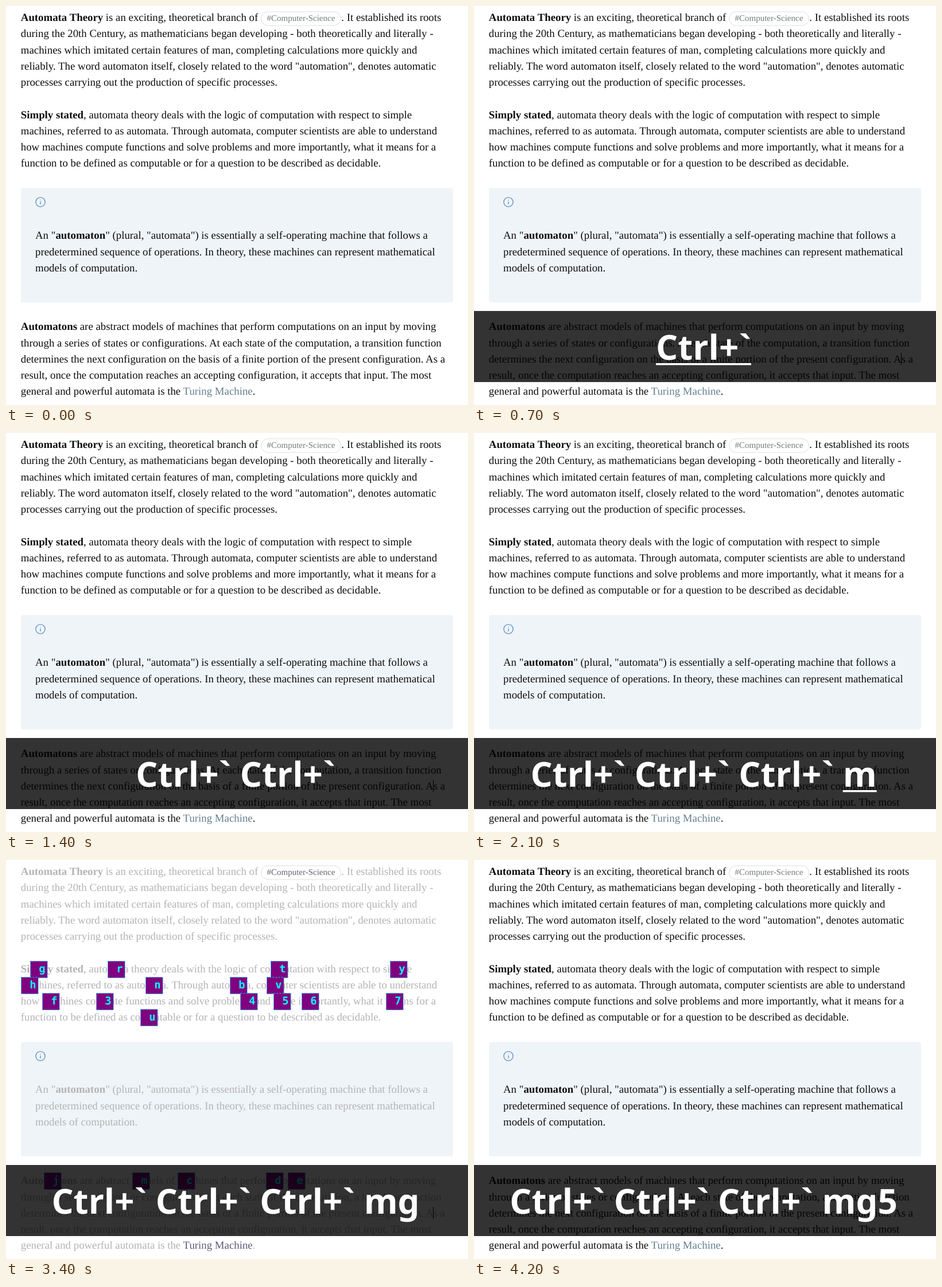
Write an HTML page that moves like this. It is 805x696 px and loops after 4.8 s.

```html
<!DOCTYPE html>
<html lang="en">
<head>
<meta charset="utf-8">
<title>Keyboard jump hints</title>
<style>
  html, body { margin: 0; width: 100%; height: 100%; overflow: hidden; background: #fff; }
  svg { display: block; width: 805px; height: 696px; }
  text { white-space: pre; text-rendering: geometricPrecision; }
  .body { font: 18.82px "Liberation Serif", "Times New Roman", serif; fill: var(--ink); }
  .body .b { font-weight: 700; }
  .body .link { fill: var(--link); }
  .tag { font: 15px "Liberation Serif", "Times New Roman", serif; fill: var(--tag); }
  .hint rect { fill: #800080; stroke: #00bfff; stroke-dasharray: 3 2; }
  .hint text { font: 700 18.82px "DejaVu Sans Mono", monospace; fill: #0ff; }
  #keys { font: 700 60px "Noto Sans", sans-serif; fill: #fff; text-anchor: middle; }
</style>
</head>
<body>
<svg viewBox="0 0 805 696">
  <rect width="805" height="696" fill="#fff"/>
  <rect x="26" y="317.5" width="753" height="199.5" rx="4" fill="#eff4f8"/>
  <g fill="none" stroke="#6394c4" stroke-width="1.4" stroke-linecap="round">
    <circle cx="60" cy="342" r="8.1"/>
    <path d="M60 341.8V345.6M60 338.6V338.7"/>
  </g>
  <g id="page"></g>
  <rect x="444.5" y="10" width="139" height="24" rx="12" fill="#fff" stroke="#dedede"/>
  <text class="tag" x="454.5" y="26">#Computer-Science</text>
  <rect id="caret" width="1" height="21" fill="#000"/>
  <g id="hints"></g>
  <g id="overlay">
    <rect y="532" width="805" height="124" fill="#000" fill-opacity=".8"/>
    <text id="keys" x="400" y="617"></text>
    <rect id="underline" y="623" height="3.4" fill="#fff"/>
  </g>
</svg>
<script>
const LOOP = 4800, STEP = 100, LEADING = 28.23;
const $ = id => document.getElementById(id);

function add(parent, tag, attrs, content = "") {
  const el = document.createElementNS("http://www.w3.org/2000/svg", tag);
  for (const k in attrs) el.setAttribute(k, attrs[k]);
  el.textContent = content;
  parent.append(el);
  return el;
}

// *bold* and _link_ mark up the runs of a line
function addLine(x, y, line) {
  const text = add($("page"), "text", { class: "body", x, y });
  for (const run of line.split(/(\*.+?\*|_.+?_)/)) {
    if (!run) continue;
    const cls = run[0] === "*" ? "b" : run[0] === "_" ? "link" : "";
    add(text, "tspan", { class: cls }, cls ? run.slice(1, -1) : run);
  }
}

function addParagraph(x, y, lines) {
  lines.forEach((line, i) => addLine(x, Math.round(y + i * LEADING), line));
}

addParagraph(25.8, 26.2, [
  "*Automata Theory* is an exciting, theoretical branch of",
  "during the 20th Century, as mathematicians began developing - both theoretically and literally -",
  "machines which imitated certain features of man, completing calculations more quickly and",
  "reliably. The word automaton itself, closely related to the word \"automation\", denotes automatic",
  "processes carrying out the production of specific processes."
]);
addLine(584.3, 26, ". It established its roots");
addParagraph(25.8, 195.6, [
  "*Simply stated*, automata theory deals with the logic of computation with respect to simple",
  "machines, referred to as automata. Through automata, computer scientists are able to understand",
  "how machines compute functions and solve problems and more importantly, what it means for a",
  "function to be defined as computable or for a question to be described as decidable."
]);
addParagraph(51, 406.3, [
  "An \"*automaton*\" (plural, \"automata\") is essentially a self-operating machine that follows a",
  "predetermined sequence of operations. In theory, these machines can represent mathematical",
  "models of computation."
]);
addParagraph(25.8, 565.3, [
  "*Automatons* are abstract models of machines that perform computations on an input by moving",
  "through a series of states or configurations. At each state of the computation, a transition function",
  "determines the next configuration on the basis of a finite portion of the present configuration. As a",
  "result, once the computation reaches an accepting configuration, it accepts that input. The most",
  "general and powerful automata is the _Turing Machine_."
]);

// baseline: label and left edge of each hint
const HINT_ROWS = [
  [26, "m 66"],
  [30, "h 480"],
  [54, "j 234 k 281"],
  [83, "n 26 t 158 yy 359 uu 419 ii 585"],
  [111, "oo 201 ll 544 bb 708"],
  [196, "gg 42 gr 177 gt 461 gy 669"],
  [224, "gh 26 gn 243 gb 390 gv 454"],
  [252, "gf 63 g3 157 g4 408 g5 466 g6 515 g7 662"],
  [280, "gu 234"],
  [565, "gj 66 gm 220 gc 299 gd 453 ge 491 bf 692"],
  [594, "bg 522"],
  [622, "bh 64"],
  [650, "bn 163 bv 705"],
  [678, "be 223 br 364"]
];
const hints = HINT_ROWS.flatMap(([y, row]) =>
  row.match(/\S+ \d+/g).map(item => {
    const [label, left] = item.split(" "), x = +left;
    const g = add($("hints"), "g", { class: "hint" });
    const width = label.length * 11.33 + 7;
    add(g, "rect", { x: x + .5, y: y - 19.5, width, height: 29 });
    const text = add(g, "text", { x: x + 4, y }, label);
    return { g, text, label };
  }));

// [shown from, underlined until, key]
const COMBO = "Ctrl+`";
const PRESSES = [
  [700, 900, COMBO], [1000, 1200, " " + COMBO], [1500, 1600, " " + COMBO],
  [2100, 2300, " m"], [3100, 3300, "g"], [3600, 3800, "5"]
];
// [on, off, x, y]
const CARETS = [
  [400, 900, 744, 605], [1400, 1800, 744, 605], [2300, 2800, 744, 605],
  [3300, 3800, 744, 605], [3800, 4200, 465, 236]
];

const within = (t, from, to) => t >= from && t < to;
const ramp = (t, from, to) => Math.min(1, Math.max(0, (t - from) / (to - from)));
const mix = (a, b, k) => `rgb(${a.map((v, i) => Math.round(v + (b[i] - v) * k))})`;

function drawKeys(t) {
  const pressed = PRESSES.filter(p => t >= p[0]);
  $("overlay").style.display = pressed.length ? "" : "none";
  if (!pressed.length) return;
  const keys = $("keys"), full = pressed.map(p => p[2]).join("");
  if (keys.textContent !== full) keys.textContent = full;
  const [, until, key] = pressed[pressed.length - 1];
  const size = key.trim().length;
  const width = keys.getSubStringLength(full.length - size, size);
  const line = $("underline");
  line.setAttribute("x", 400 + keys.getComputedTextLength() / 2 - width);
  line.setAttribute("width", width);
  line.style.display = t < until ? "" : "none";
}

function drawHints(t) {
  const shown = within(t, 2300, 3800), filtered = t >= 3300;
  $("hints").style.display = shown ? "" : "none";
  for (const { g, text, label } of hints) {
    const match = /^g./.test(label);
    g.style.display = !filtered || match ? "" : "none";
    text.textContent = filtered && match ? "\u00a0" + label[1] : label;
  }
}

function drawCaret(t) {
  const now = CARETS.find(c => within(t, c[0], c[1])), caret = $("caret");
  caret.style.display = now ? "" : "none";
  if (!now) return;
  caret.setAttribute("x", now[2]);
  caret.setAttribute("y", now[3]);
}

function draw(t) {
  const dim = ramp(t, 2200, 2400) - ramp(t, 3700, 4000);
  const style = document.documentElement.style;
  style.setProperty("--ink", mix([14, 14, 14], [179, 179, 179], dim));
  style.setProperty("--link", mix([99, 127, 142], [94, 90, 120], dim));
  style.setProperty("--tag", mix([117, 125, 119], [98, 100, 114], dim));
  drawCaret(t);
  drawHints(t);
  drawKeys(t);
}

let start, last = -1;
function frame(now) {
  start ??= now;
  const t = Math.floor(((now - start) % LOOP) / STEP) * STEP;
  if (t !== last) draw(last = t);
  requestAnimationFrame(frame);
}
draw(0);
requestAnimationFrame(frame);
</script>
</body>
</html>
```
